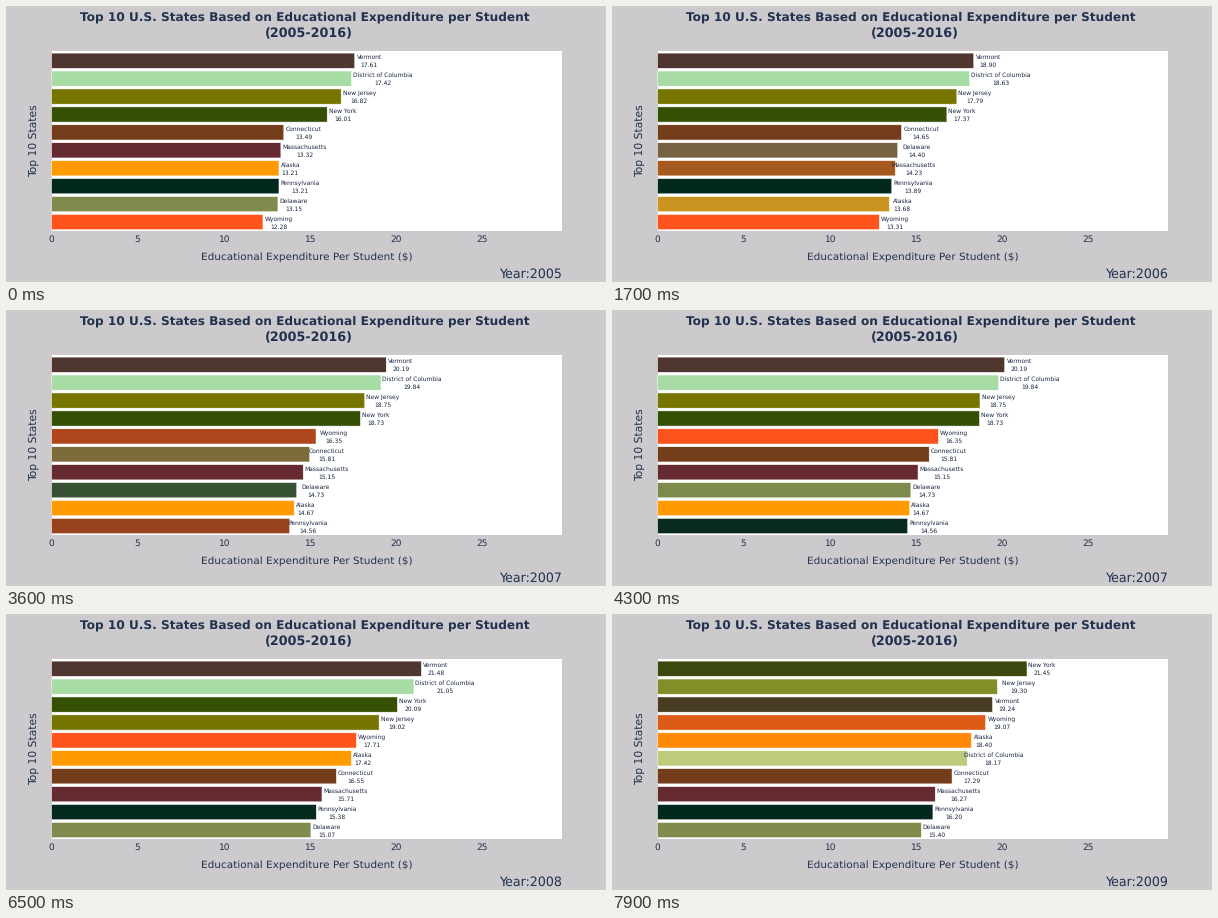
A matplotlib script that plays this animation: 600 by 276 pixels, repeating every 8 s.

```python
import matplotlib.pyplot as plt
import numpy as np
from matplotlib.animation import FuncAnimation
from matplotlib.colors import to_rgb
from matplotlib.patches import Rectangle
from matplotlib.textpath import TextPath

W, H, DPI = 600, 276, 72          # at 72 dpi one point is one pixel
FRAMES, STEP = 80, 100
START, PERIOD, DURATION = 640, 2018, 2000
FIRST, LAST = 2005, 2009
X0, UNIT = 45.5, 17.22            # bar origin and pixels per unit
ROW0, ROW, BAR = 54.7, 17.93, 15.2
LABEL, PAD = 6.05, 1.8
INK, LABEL_INK = "#22314f", "#172440"

plt.rcParams["font.family"] = "DejaVu Sans"
plt.rcParams["text.hinting"] = "none"

# name: colour and turning points; spending runs straight between them
STATES = {
    "Vermont": ("#4f362e", {2005: 17.61, 2008: 21.48, 2009: 19.24}),
    "District of Columbia": ("#a7dca5", {2005: 17.42, 2008: 21.05, 2009: 18.17}),
    "New Jersey": ("#757500", {2005: 16.82, 2007: 18.75, 2009: 19.30}),
    "New York": ("#355003", {2005: 16.01, 2009: 21.45}),
    "Connecticut": ("#733c1a", {2005: 13.49, 2007: 15.81, 2009: 17.29}),
    "Massachusetts": ("#662a31", {2005: 13.32, 2007: 15.15, 2009: 16.27}),
    "Alaska": ("#ff9a00", {2005: 13.21, 2006: 13.68, 2007: 14.67,
                           2008: 17.42, 2009: 18.40}),
    "Pennsylvania": ("#03291f", {2005: 13.21, 2007: 14.56, 2009: 16.20}),
    "Delaware": ("#7f8c4d", {2005: 13.15, 2006: 14.40, 2009: 15.40}),
    "Wyoming": ("#ff541c", {2005: 12.28, 2006: 13.31, 2007: 16.35, 2009: 19.07}),
}


def text_width(s):
    return TextPath((0, 0), s, size=LABEL).get_extents().width


def spending(name, year):
    points = STATES[name][1]
    return np.interp(year, list(points), list(points.values()))


def standings(year):
    """Names, values and bar geometry, largest first."""
    names = sorted(STATES, key=lambda s: -spending(s, year))
    values = np.array([spending(s, year) for s in names])
    ends = X0 + UNIT * values
    half = np.array([text_width(s) / 2 for s in names])
    return {
        "names": names,
        "values": values,
        "ends": ends,
        "centers": ends + PAD + half,
        "colors": np.array([to_rgb(STATES[s][0]) for s in names]),
    }


YEARS = [standings(y) for y in range(FIRST, LAST + 1)]


def cubic_in_out(u):
    u = min(max(u, 0), 1)
    return 4 * u ** 3 if u < 0.5 else 1 - 4 * (1 - u) ** 3


def lerp(a, b, k):
    return a + (b - a) * k


fig = plt.figure(figsize=(W / DPI, H / DPI), dpi=DPI, facecolor="#cccacc")
ax = fig.add_axes([0, 0, 1, 1])
ax.set_xlim(0, W)
ax.set_ylim(H, 0)
ax.axis("off")


def write(x, y, s, size, color=INK, ha="center", va="baseline", **kw):
    return ax.text(x, y, s, fontsize=size, color=color, ha=ha, va=va, **kw)


ax.add_patch(Rectangle((X0, 45.3), 510, 179.2, fc="white", lw=0))
write(298.5, 14.8, "Top 10 U.S. States Based on Educational Expenditure per Student",
      12.08, weight="bold")
write(303, 31.5, "(2005-2016)", 12.75, weight="bold")
write(301, 254.2, "Educational Expenditure Per Student ($)", 10.45)
write(27.6, 135, "Top 10 States", 10.7, va="center", rotation=90)
for tick in range(0, 30, 5):
    write(X0 + UNIT * tick, 235.8, str(tick), 9)
year_text = write(555.5, 271.6, "", 12.6, ha="right")

bars, names, amounts = [], [], []
for i in range(len(STATES)):
    y = ROW0 + ROW * i
    bars.append(ax.add_patch(
        Rectangle((X0, y - BAR / 2), 0, BAR, lw=0.5, ec="white", snap=False)))
    names.append(write(0, y - 1.6, "", LABEL, LABEL_INK))
    amounts.append(write(0, y + 6.5, "", LABEL, LABEL_INK))


def update(n):
    t = n * STEP - START
    if t < 0:
        now, k = 0, 1
    else:
        now = min(int(t // PERIOD) + 1, len(YEARS) - 1)
        k = cubic_in_out((t - (now - 1) * PERIOD) / DURATION)
    old, new = YEARS[max(now - 1, 0)], YEARS[now]

    ends = lerp(old["ends"], new["ends"], k)
    centers = lerp(old["centers"], new["centers"], k)
    colors = lerp(old["colors"], new["colors"], k)
    for i, bar in enumerate(bars):
        bar.set_width(ends[i] - X0)
        bar.set_facecolor(np.clip(colors[i], 0, 1))
        names[i].set_text(new["names"][i])
        amounts[i].set_text(f"{new['values'][i]:.2f}")
        names[i].set_x(centers[i])
        amounts[i].set_x(centers[i])
    year_text.set_text(f"Year:{FIRST + now}")
    return [*bars, *names, *amounts, year_text]


anim = FuncAnimation(fig, update, frames=FRAMES, interval=STEP,
                     repeat=True, repeat_delay=0, blit=False)
plt.show()
```
